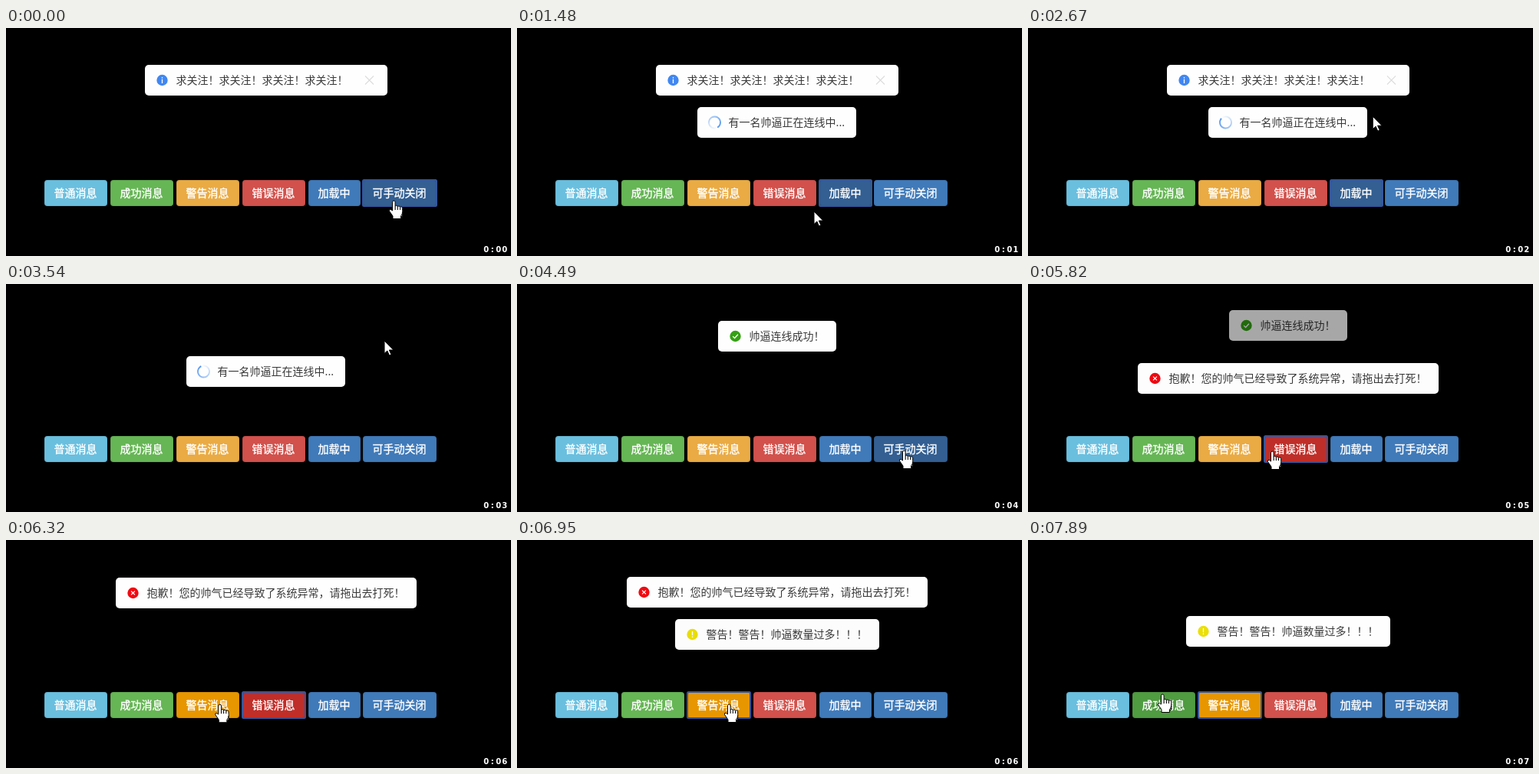
An HTML page that plays this animation: 658 by 297 pixels, repeating every 8000 ms.

```html
<!DOCTYPE html>
<html lang="zh-CN">
<head>
<meta charset="utf-8">
<title>消息提示</title>
<style>
html, body { margin: 0; width: 100%; height: 100%; overflow: hidden; background: #000; }
svg { display: block; width: 658px; height: 297px; }
text { font: 14px "Noto Sans CJK SC", "Noto Sans CJK", sans-serif; text-spacing-trim: space-all; font-feature-settings: "chws" 0; white-space: pre; }
.label { fill: #fff; stroke: #fff; stroke-width: .35px; }
.clock { font: bold 10px "DejaVu Sans", sans-serif; fill: #fff; text-anchor: middle; }
</style>
</head>
<body>
<svg id="stage" viewBox="0 0 658 297" xmlns="http://www.w3.org/2000/svg"></svg>
<script>
const LOOP = 8000, CENTER = 339, EM = 14;
const stage = document.getElementById('stage');

function add(parent, tag, attrs = {}, text) {
  const el = document.createElementNS('http://www.w3.org/2000/svg', tag);
  set(el, attrs);
  if (text) el.textContent = text;
  parent.appendChild(el);
  return el;
}
function set(el, attrs) {
  for (const key in attrs) el.setAttribute(key, attrs[key]);
}
const clamp = p => Math.min(1, Math.max(0, p));
const smooth = p => p * p * (3 - 2 * p);

// CSS "ease", cubic-bezier(.25, .1, .25, 1), solved by bisection
function ease(p) {
  const bezier = (a, b, u) => 3 * a * u * (1 - u) ** 2 + 3 * b * u * u * (1 - u) + u ** 3;
  let lo = 0, hi = 1;
  for (let i = 0; i < 20; i++) {
    const mid = (lo + hi) / 2;
    if (bezier(.25, .25, mid) < p) lo = mid; else hi = mid;
  }
  return bezier(.1, 1, lo);
}
const since = (t, start) => ease(clamp((t - start) / 300));

// Buttons: label, colour, colour while hovered or focused
const TOP = 198, HEIGHT = 34;
let left = 50;
const buttons = [
  ['普通消息', '#6abfdf', '#46aed0'], ['成功消息', '#66b655', '#509c41'],
  ['警告消息', '#eaab44', '#e79600'], ['错误消息', '#d2514c', '#c02e29'],
  ['加载中', '#407ab9', '#335f92'], ['可手动关闭', '#407ab9', '#335f92']
].map(([label, color, dark]) => {
  const x = Math.round(left), w = label.length * EM + 26;
  left += w + 3.89;
  const box = add(stage, 'rect', { x, y: TOP, width: w, height: HEIGHT, rx: 4 });
  add(stage, 'rect', { x: x + .5, y: TOP + .5, width: w - 1, height: HEIGHT - 1, rx: 3.5,
    fill: 'none', stroke: '#000', 'stroke-opacity': .08 });
  const ring = add(stage, 'rect', { x, y: TOP, width: w, height: HEIGHT, rx: 1.5,
    fill: 'none', stroke: '#35569c', 'stroke-width': 2 });
  add(stage, 'text', { x: x + 12.5, y: 220, class: 'label' }, label);
  return { x, w, box, ring, color, dark };
});

// Toast icons, drawn around 0,0
const disc = (color, mark) => g => {
  add(g, 'circle', { r: 7.2, fill: color });
  add(g, 'path', { d: mark, fill: 'none', stroke: '#fff', 'stroke-width': 1.3 });
};
function spinner(g) {
  const wheel = add(g, 'g'), n = 24, r = 7.5;
  const at = i => [Math.cos, Math.sin].map(f => r * f(2 * Math.PI * i / n)).join(' ');
  for (let i = 1; i < n; i++)
    add(wheel, 'path', { d: `M${at(i)}A${r} ${r} 0 0 1 ${at(i + 1)}`, fill: 'none',
      stroke: '#4a8fec', 'stroke-width': 1.9, opacity: i / (n - 1) });
  return wheel;
}

const toasts = [
  { icon: disc('#4087f1', 'M0 -4V-2.4M0 -1.3V4'), text: '求关注！求关注！求关注！求关注！', start: -1000, end: 3176, closable: true },
  { icon: spinner, text: '有一名帅逼正在连线中...', start: 700, end: 3718 },
  { icon: disc('#35a114', 'M-3.3 .1L-.9 2.5L3.4 -2.2'), text: '帅逼连线成功！', start: 3755, end: 5755 },
  { icon: disc('#f00a12', 'M-2.4 -2.4L2.4 2.4M2.4 -2.4L-2.4 2.4'), text: '抱歉！您的帅气已经导致了系统异常，请拖出去打死！', start: 5543, end: 7543 },
  { icon: disc('#ebdf08', 'M0 -4V1.2M0 2.4V4'), text: '警告！警告！帅逼数量过多！！！', start: 6690, end: 8690 }
];
toasts.forEach((m, i) => {
  const textWidth = [...m.text].reduce((sum, c) => sum + (c === '.' ? 3.7 : EM), 0);
  const w = Math.round(textWidth) + (m.closable ? 92 : 56);
  m.x = Math.floor(CENTER - w / 2);
  // Each toast slides up once the one above it has gone
  m.up = i ? toasts[i - 1].end + 322 : m.start;
  m.g = add(stage, 'g');
  add(m.g, 'rect', { width: w, height: 40, rx: 5, fill: '#fefefe' });
  m.wheel = m.icon(add(m.g, 'g', { transform: 'translate(22.5 20)' }));
  add(m.g, 'text', { x: 40.5, y: 25, fill: '#3a3a3a' }, m.text);
  if (m.closable)
    add(m.g, 'path', { d: `M${w - 29} 14.5l11 11m0 -11l-11 11`, stroke: '#dcdcdc', 'stroke-width': 1.1 });
});

// Clock
const clock = [...'0:00'].map((c, i) => add(stage, 'text', { x: 625.7 + 8 * i, y: 292, class: 'clock' }, c));

// Pointers, tip at 0,0
const ink = { fill: '#fff', stroke: '#000', 'stroke-linejoin': 'round' };
const arrow = add(stage, 'path', { ...ink, d: 'M0 0V16.5L3.8 13L6.5 19L9 18L6.3 12H11.8Z' });
const hand = add(stage, 'g', ink);
for (let i = 3; i >= 0; i--)
  add(hand, 'rect', { x: -2 + 3.2 * i, y: i && 5.4 + .8 * i, width: 3.6, height: 16 - i, rx: 1.8 });
add(hand, 'path', { d: 'M-2 13L-4 11.4Q-7 11 -6 13.5L-1.5 20V23.5H9V20Q11.2 17.5 11.2 14', stroke: '#000' });
add(hand, 'path', { d: 'M-1.4 12H10.6V15H-1.4Z', stroke: 'none' });

// Moves: depart, arrive, x, y, and the button focused by a click there (-1 clears)
const start = { x: 505.5, y: 225, focus: 5 };
const moves = [
  [130, 560, 427, 221, 4], [1100, 1480, 387, 239], [1700, 3170, 472, 70, -1],
  [3250, 3540, 493, 74], [3600, 4300, 521, 210], [4340, 4490, 504.5, 217],
  [4870, 5300, 318.5, 218, 3], [5850, 6400, 276.5, 214, 2], [7000, 7700, 175.5, 201]
];
function pointerAt(t) {
  let { x, y, focus } = start;
  for (const [from, to, nx, ny, click = focus] of moves) {
    const p = smooth(clamp((t - from) / (to - from)));
    x += (nx - x) * p;
    y += (ny - y) * p;
    if (t >= to) focus = click;
  }
  return { x, y, focus };
}

function draw(t) {
  const { x, y, focus } = pointerAt(t);
  let pointing = t < toasts[0].end && Math.hypot(x - 473, y - 68) < 9;

  buttons.forEach((b, i) => {
    const over = x >= b.x && x < b.x + b.w && y >= TOP && y < TOP + HEIGHT;
    pointing = pointing || over;
    set(b.box, { fill: over || i === focus ? b.dark : b.color });
    set(b.ring, { opacity: i === focus ? 1 : 0 });
  });

  for (const m of toasts) {
    const enter = since(t, m.start), leave = since(t, m.end);
    const top = Math.round(103 - 55 * since(t, m.up) - 40 * (1 - enter + leave));
    set(m.g, { transform: `translate(${m.x} ${top})`, opacity: enter * (1 - leave) });
    if (m.wheel) set(m.wheel, { transform: `rotate(${60 + (t - 1480) / 820 * 360})` });
  }

  clock[3].textContent = Math.floor(t / 1000);
  const transform = `translate(${x} ${y})`;
  set(hand, { transform, opacity: pointing ? 1 : 0 });
  set(arrow, { transform, opacity: pointing ? 0 : 1 });
}

const begin = performance.now();
function loop() {
  draw((performance.now() - begin) % LOOP);
  requestAnimationFrame(loop);
}
loop();
</script>
</body>
</html>
```
